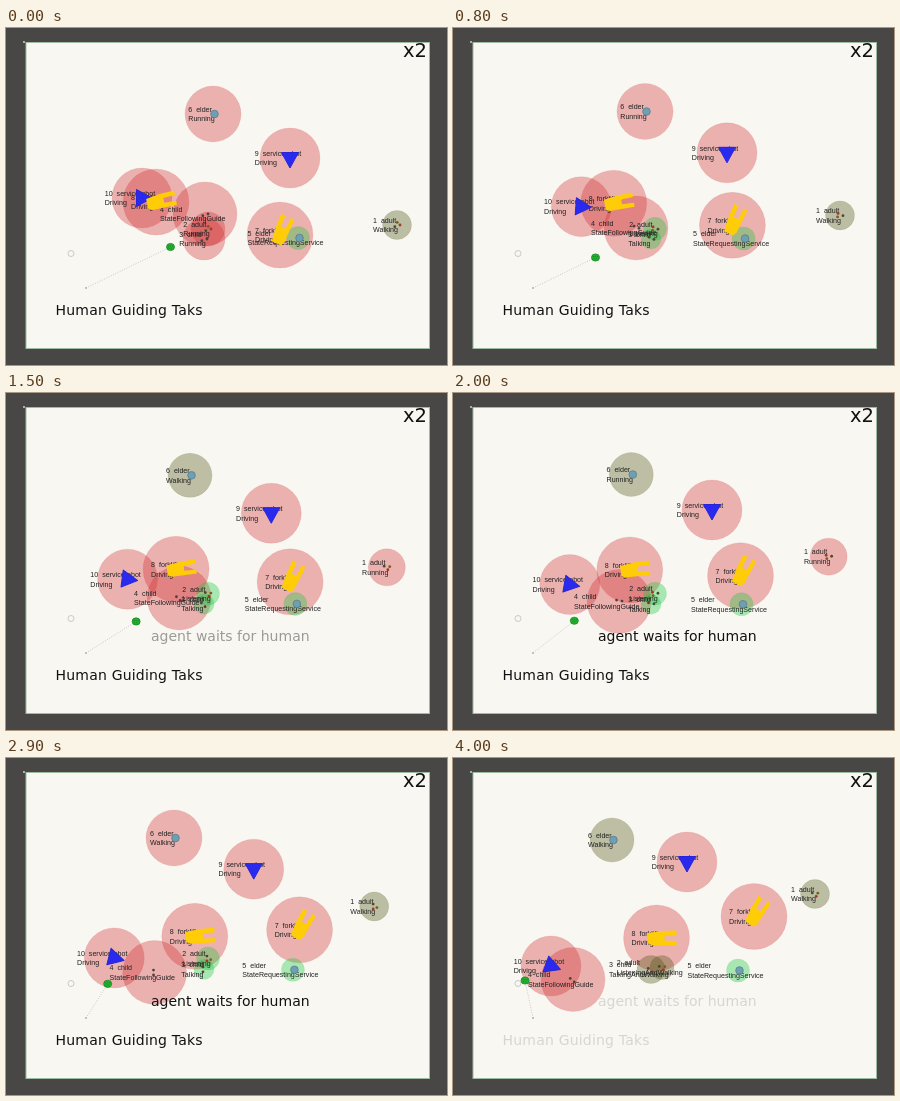
An HTML page that plays this animation: 441 px wide and 337 px high, repeating every 4.1 s.

```html
<!DOCTYPE html>
<html lang="en">
<head>
<meta charset="utf-8">
<title>Human guiding simulation</title>
<style>
  html, body { margin: 0; width: 100%; height: 100%; overflow: hidden; background: #484746; }
  svg { display: block; width: 441px; height: 337px; }
  text { white-space: pre; }
  .label { font: 7.1px "Liberation Sans", Arial, sans-serif; fill: #222; }
  .title { font: 14px "DejaVu Sans", Verdana, sans-serif; fill: #111; }
  #title { letter-spacing: 0.2px; }
  .speed { font: 19.5px "DejaVu Sans", Verdana, sans-serif; fill: #111; }
</style>
</head>
<body>
<svg viewBox="0 0 441 337" xmlns="http://www.w3.org/2000/svg">
  <rect width="441" height="337" fill="#484746"/>
  <rect x="20" y="14.5" width="403.5" height="306" fill="#f8f7f2" stroke="#9dbba0"/>
  <circle cx="18" cy="14" r="0.9" fill="#ddd"/>
  <circle cx="65" cy="225.5" r="3" fill="none" stroke="#c4c4c0" stroke-width="0.9"/>
  <line id="rope" x1="80" y1="260" stroke="#bbb" stroke-width="0.8" stroke-dasharray="1 1.5"/>
  <circle cx="80" cy="260" r="0.9" fill="#aaa"/>
  <g id="discs"></g>
  <g id="labels"></g>
  <g id="bodies"></g>
  <text class="title" id="caption" x="145" y="247.5">agent waits for human</text>
  <text class="title" id="title" x="49.5" y="287">Human Guiding Taks</text>
  <text class="speed" x="397" y="29">x2</text>
</svg>
<script>
const LOOP = 4100, STEP = 100, FADE = 0.4;
const RED = 'rgb(208,48,50)', OLIVE = 'rgb(77,84,17)', GREEN = 'rgb(20,200,60)';
const $ = id => document.getElementById(id);
const clamp = v => Math.max(0, Math.min(1, v));
const mix = (a, b, k) => a + (b - a) * k;

function add(parent, tag, attrs = {}) {
  const el = document.createElementNS('http://www.w3.org/2000/svg', tag);
  parent.appendChild(el);
  return set(el, attrs);
}
function set(el, attrs) {
  for (const k in attrs) el.setAttribute(k, attrs[k]);
  return el;
}

// Position on a path of [time, x, y] waypoints, at constant speed between them.
function along(path, t) {
  let i = 0;
  while (i < path.length - 2 && t >= path[i + 1][0]) i++;
  const [t0, x0, y0] = path[i], [t1, x1, y1] = path[i + 1];
  const k = clamp((t - t0) / (t1 - t0));
  return [mix(x0, x1, k), mix(y0, y1, k)];
}

function robot(g) {
  add(g, 'path', { d: 'M10 0L-5.5 8.5V-8.5Z', fill: '#2a2aee', stroke: '#2626d8', 'stroke-linejoin': 'round' });
}
function forklift(g) {
  add(g, 'path', { d: 'M-9 -5L5 -7L20 -7.5V-3L8 -2.5V2.5L20 3V7H-5L-9 5Z', fill: '#ffcc08' });
}
function elder(g) {
  add(g, 'circle', { cx: 1.5, r: 3.8, fill: '#6f9fb2', stroke: '#557f8f', 'stroke-width': 0.8 });
}
// Small coloured feet that circle around the centre.
const walker = (...colors) => g => {
  const feet = colors.map(c => add(g, 'circle', { r: 1.4, fill: c }));
  return t => feet.forEach((f, i) => {
    const a = t * 5 + i * 2.4;
    set(f, { cx: 3 * Math.cos(a), cy: 2.6 * Math.sin(a) });
  });
};
const adult = walker('#9a3b22', '#4d4a2a', '#7d5a25');
const child = walker('#5c3a3a', '#4a4444');

function moodColor(state) {
  if (state.endsWith('Walking')) return OLIVE;
  return /Driving|Running|Following/.test(state) ? RED : GREEN;
}

// states: [start, text, disc radius]; turn: first and last heading
const agents = [
  { name: '6  elder', body: elder,
    path: [[0, 207, 86], [0.8, 192, 83.5], [2.9, 168, 80], [4, 159, 82]],
    states: [[0, 'Running', 28], [1.05, 'Walking', 22], [2, 'Running', 28], [2.9, 'Walking', 22]] },
  { name: '9  servicerobot', body: robot, turn: [90, 90],
    path: [[0, 284, 130], [4, 234, 104]], states: [[0, 'Driving', 30]] },
  { name: '10  servicerobot', body: robot, turn: [0, 20],
    path: [[0, 136, 170], [2.5, 112, 197], [4, 98, 208]], states: [[0, 'Driving', 30]] },
  { name: '8  forklift', body: forklift, turn: [-12, 0],
    path: [[0, 150, 174], [4, 203.5, 180]], states: [[0, 'Driving', 33]] },
  { name: '7  forklift', body: forklift, turn: [-66, -57],
    path: [[0, 274, 207], [4, 301, 158.5]], states: [[0, 'Driving', 33]] },
  { name: '4  child', body: child,
    path: [[0, 199, 186], [0.8, 183, 200], [2.5, 159, 212], [4, 120, 221.5]],
    states: [[0, 'StateFollowingGuide', 32]] },
  { name: '5  elder', body: elder,
    path: [[0, 292, 210], [4, 285, 212.5]], states: [[0, 'StateRequestingService', 11.5]] },
  { name: '1  adult', body: adult,
    path: [[0, 391, 197], [1, 386, 185], [2.5, 370.5, 153], [4, 362, 136]],
    states: [[0, 'Walking', 14.5], [1, 'Running', 18.5], [2.3, 'Walking', 14.5]] },
  { name: '2  adult', body: adult,
    path: [[0, 202, 201], [3, 202, 200.5], [3.4, 209, 209.5]],
    states: [[0, 'Running', 17], [0.2, 'Listening', 11.5], [3, 'ListeningAndWalking', 12]] },
  { name: '3  child', body: child,
    path: [[0, 198, 211], [4, 198, 211.5]],
    states: [[0, 'Running', 21], [0.2, 'Talking', 10], [3, 'TalkingAndWalking', 14]] }
];

for (const a of agents) {
  a.discs = [add($('discs'), 'circle'), add($('discs'), 'circle')];
  a.label = add($('labels'), 'g', { class: 'label' });
  a.lines = [add(a.label, 'text'), add(a.label, 'text', { y: 9.5 })];
  a.lines[0].textContent = a.name;
  a.group = add($('bodies'), 'g');
  a.animate = a.body(a.group);
}

const ballPath = [[0, 164.5, 219], [0.8, 142.5, 229.5], [2.5, 112.5, 227], [4, 72, 222.5]];
const ball = add($('bodies'), 'g');
add(ball, 'ellipse', { rx: 4, ry: 3.6, fill: '#22b02e', stroke: '#178a22', 'stroke-width': 0.8 });
add(ball, 'path', { d: 'M-2.5 -1H2.5M-2 1.2H2', stroke: '#0f7a1c', 'stroke-width': 0.7, 'stroke-dasharray': '1 1' });

function drawDisc(el, cx, cy, [, text, r], k) {
  const color = moodColor(text);
  set(el, { cx, cy, r, fill: color, 'fill-opacity': 0.35 * k,
            stroke: color, 'stroke-opacity': 0.12 * k, 'stroke-width': 0.8 });
}

function drawAgent(a, t) {
  const [x, y] = along(a.path, t);
  let i = a.states.length - 1;
  while (a.states[i][0] > t) i--;
  const state = a.states[i];
  const k = i ? clamp((t - state[0]) / FADE) : 1;
  drawDisc(a.discs[0], x, y, a.states[Math.max(0, i - 1)], 1 - k);
  drawDisc(a.discs[1], x, y, state, k);

  a.lines[1].textContent = state[1];
  const width = Math.max(...a.lines.map(el => el.getComputedTextLength()));
  set(a.label, { transform: `translate(${x - 0.52 * width - 11} ${y - 2.2})` });

  const turn = a.turn ? mix(...a.turn, t / 4) : 0;
  set(a.group, { transform: `translate(${x} ${y}) rotate(${turn})` });
  if (a.animate) a.animate(t);
}

function draw(ms) {
  const t = Math.floor((ms % LOOP) / STEP) * STEP / 1000;
  agents.forEach(a => drawAgent(a, t));
  const [x, y] = along(ballPath, t);
  set(ball, { transform: `translate(${x} ${y})` });
  set($('rope'), { x2: x, y2: y });
  const out = clamp((4.15 - t) / 1.05);
  set($('title'), { opacity: out });
  set($('caption'), { opacity: Math.min(out, clamp((t - 1.2) / 0.75)) });
}

const start = performance.now();
function tick() {
  draw(performance.now() - start);
  requestAnimationFrame(tick);
}
tick();
</script>
</body>
</html>
```
